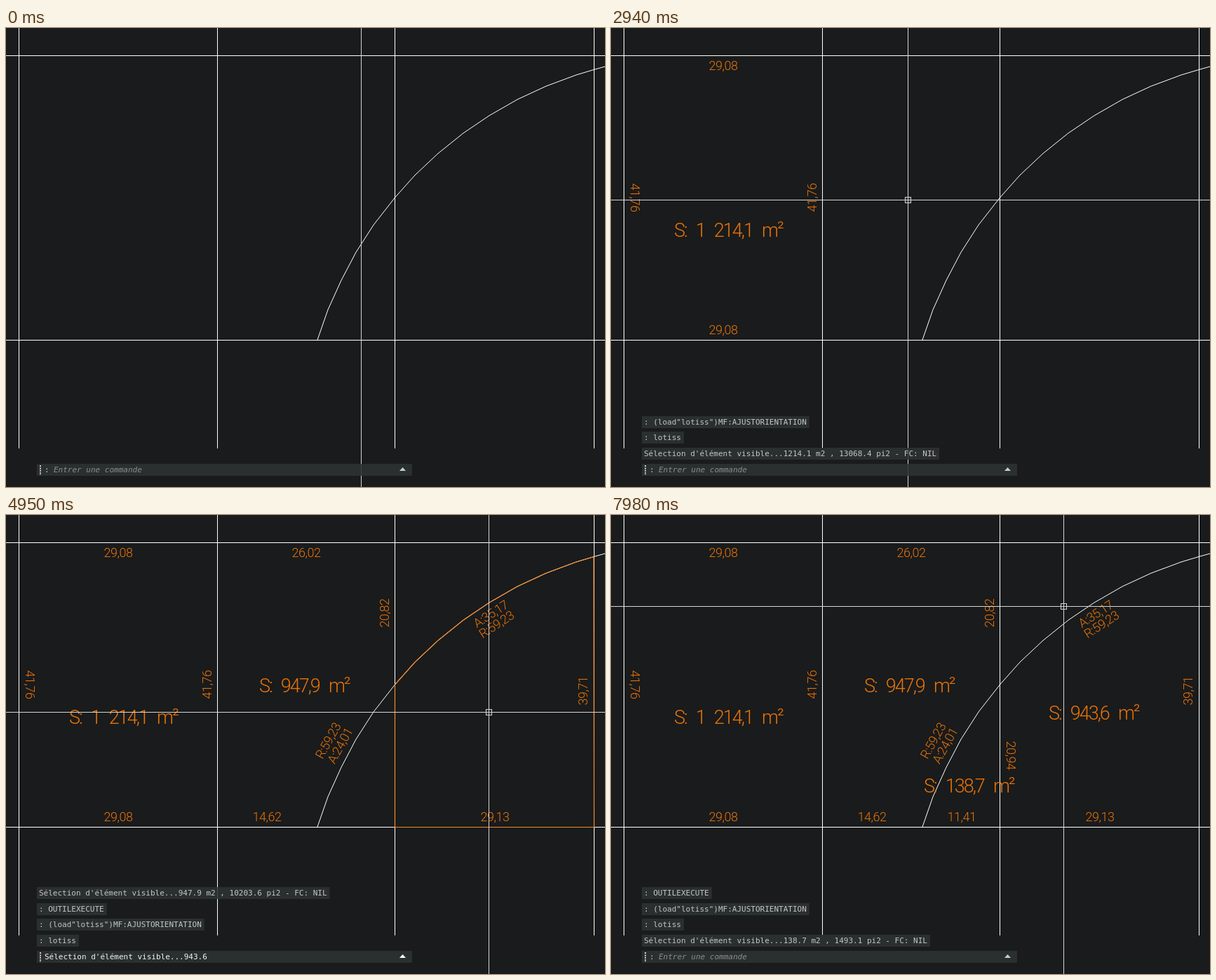
An HTML page for the animation above (8000 ms loop, 854 by 655 pixels).

```html
<!DOCTYPE html>
<html lang="fr">
<head>
<meta charset="utf-8">
<title>Lotissement</title>
<style>
  html, body { margin: 0; width: 100%; height: 100%; overflow: hidden; background: #1a1b1c; }
  svg { display: block; width: 100vw; height: 100vh; }
  text { white-space: pre; }
  .line { fill: none; stroke: #fff; stroke-width: 1; }
  .crisp { shape-rendering: crispEdges; }
  .outline { fill: none; stroke: #f28a30; stroke-width: 1.2; }
  .dim, .area { font-family: Roboto, sans-serif; font-weight: 300; fill: #e87408; }
  .dim { font-size: 18px; letter-spacing: -.5px; text-anchor: middle; }
  .area { font-size: 27px; letter-spacing: -2px; word-spacing: 8.5px; }
  .area.hot { fill: #0f9ad0; font-weight: 400; }
  .cross { fill: none; stroke: #d6d6d6; stroke-width: 1; }
  .mono { font: 11px "DejaVu Sans Mono", monospace; fill: #c4c6c6; }
  .hint { fill: #8b8f8f; font-style: italic; }
  .run { fill: #f4f4f4; }
  .panel { fill: #2d3334; fill-opacity: .88; }
  .tip text { font: 10.7px "Open Sans", "Noto Sans", sans-serif; letter-spacing: -.2px; fill: #fff; }
</style>
</head>
<body>
<svg id="stage" viewBox="0 0 854 655" xmlns="http://www.w3.org/2000/svg"></svg>
<script>
const LOOP = 8000;
const stage = document.getElementById('stage');

function add(parent, tag, attrs = {}, text) {
  const node = document.createElementNS('http://www.w3.org/2000/svg', tag);
  for (const key in attrs) node.setAttribute(key, attrs[key]);
  if (text !== undefined) node.textContent = text;
  parent.appendChild(node);
  return node;
}
const show = (node, on) => { node.style.display = on ? '' : 'none'; };

// Plan: boundary lines and the segmented road curve
const arc = [[444, 445], [459, 402], [478, 360], [499, 320], [524, 281], [554.5, 242], [583, 210],
  [616, 179], [652, 150], [689, 125], [729, 102], [770, 83], [813, 67], [838, 59.5], [854, 55]];
const path = points => 'M' + points.map(p => p.join(' ')).join('L');

add(stage, 'path', {
  class: 'line crisp',
  d: 'M0 39.5H854M0 445.5H854' + [18, 301, 554, 838].map(x => `M${x + .5} 0V600`).join('')
});
add(stage, 'path', { class: 'line', d: path(arc) });

// Each lot: run from start to end, then the pointer leaves at `leave`
const lots = [
  { start: 1910, end: 2030, leave: 2190, x: 167, y: 288, textX: 90, area: '1 214,1',
    result: '1214.1', feet: '13068.4', edge: 'M18.5 39.5H301.5V445.5H18.5Z' },
  { start: 3270, end: 3420, leave: 3590, x: 425, y: 243, textX: 361, area: '947,9',
    result: '947.9', feet: '10203.6',
    edge: path([...arc.slice(0, 6), [554.5, 39.5], [301.5, 39.5], [301.5, 445.5]]) + 'Z' },
  { start: 4950, end: 5050, leave: 5210, x: 688, y: 282, textX: 624, area: '943,6',
    result: '943.6', feet: '10156.9',
    edge: path([...arc.slice(5, 14), [838.5, 445.5], [554.5, 445.5]]) + 'Z' },
  { start: 6970, end: 7180, leave: 7330, x: 510, y: 386, textX: 446, area: '138,7',
    result: '138.7', feet: '1493.1', edge: path([...arc.slice(0, 6), [554.5, 445.5]]) + 'Z' }
];
for (const lot of lots) {
  lot.done = lot.end - 60;
  lot.message = `Sélection d'élément visible...${lot.result}`;
  lot.summary = `${lot.message} m2 , ${lot.feet} pi2 - FC: NIL`;
  lot.outline = add(stage, 'path', { class: 'outline', d: lot.edge });
  lot.label = add(stage, 'text', { class: 'area', x: lot.textX, y: lot.y + 10 }, `S: ${lot.area} m`);
  add(lot.label, 'tspan', { dy: -3 }, '²');
}

// label, centre x, centre y, angle, time of appearance
const dims = [
  ['29,08', 160, 53, 0, 1910], ['29,08', 160, 430, 0, 1910],
  ['41,76', 34, 242, 90, 1910], ['41,76', 286, 242, -90, 1910],
  ['26,02', 428, 53, 0, 3270], ['14,62', 372, 430, 0, 3270],
  ['20,82', 539, 140, -90, 3270],
  ['R:59,23', 459, 322, -61, 3270], ['A:24,01', 476, 329, -61, 3270],
  ['A:35,17', 691, 141, -33, 4950], ['R:59,23', 699, 156, -33, 4950],
  ['39,71', 822, 251, -90, 4950], ['29,13', 697, 430, 0, 4950],
  ['20,94', 570, 343, 90, 4980], ['11,41', 500, 430, 0, 6970]
].map(([label, x, y, angle, time]) => ({
  time,
  node: add(stage, 'text', {
    class: 'dim', y: 6.5, transform: `translate(${x} ${y}) rotate(${angle})`
  }, label)
}));

// Crosshair
const hair = add(stage, 'path', { class: 'cross crisp' });

// Hover tooltip
const tip = add(stage, 'g', { class: 'tip' });
add(tip, 'rect', { x: .5, y: .5, width: 163, height: 72, fill: '#2b2d33', stroke: '#6c6e72', class: 'crisp' });
add(tip, 'rect', { x: 1, y: 1, width: 162, height: 16, fill: '#191a1d' });
add(tip, 'path', { d: 'M1 34.5H163M1 51.5H163M1 67.5H163M47.5 17V68', stroke: '#232429', class: 'crisp' });
add(tip, 'path', { d: 'M153.5 5.5l4 4m0 -4l-4 4', stroke: '#ddd' });
add(tip, 'rect', { x: 53.5, y: 19.5, width: 11, height: 11, fill: '#ff8000', stroke: '#111' });
for (const [label, x, y] of [
  ['Texte', 2, 13], ['Couleur', 5, 29], ['ParCalque', 70, 28], ['Calque', 5, 46],
  ['E-TXT-LOT-SUPERFICIE', 50, 46], ['Hauteur', 5, 63], ['1.6875 m', 51, 63]
]) add(tip, 'text', { x, y }, label);

// Command history and command line
const history = [531, 554, 576, 599].map(y => ({
  box: add(stage, 'rect', { class: 'panel', x: 44, y, height: 17 }),
  text: add(stage, 'text', { class: 'mono', x: 47, y: y + 11.5 })
}));
add(stage, 'rect', { class: 'panel', x: 44, y: 622, width: 535, height: 17 });
add(stage, 'path', { d: 'M49 624V638', stroke: '#d0d0d0', 'stroke-width': 2, 'stroke-dasharray': '2 1.4' });
const arrow = add(stage, 'path', { d: 'M561 632L565.5 627L570 632Z' });
const colon = add(stage, 'text', { class: 'mono', x: 55, y: 634 }, ':');
const hint = add(stage, 'text', { class: 'mono hint', x: 68, y: 634 }, 'Entrer une commande');
const running = add(stage, 'text', { class: 'mono run', x: 55, y: 634 });
const caret = add(stage, 'path', { d: 'M69.5 623V637', class: 'line crisp' });

const prompts = [[500, 1910], [3000, 3270], [4410, 4950], [5760, 6970]];

function historyLines(t) {
  const index = lots.findLastIndex(lot => t >= lot.start);
  if (index < 0) return [];
  const command = [': (load"lotiss")MF:AJUSTORIENTATION', ': lotiss'];
  if (index > 0) command.unshift(': OUTILEXECUTE');
  if (t >= lots[index].end) return [...command, lots[index].summary];
  return index > 0 ? [lots[index - 1].summary, ...command] : command;
}

// Pointer path: time, x, y
const route = [
  [0, 506, 660], [1050, 506, 660], [1400, 350, 450], [1850, 167, 288],
  [2190, 167, 288], [2350, 314, 329], [2650, 385, 285], [3000, 425, 243],
  [3590, 425, 243], [3730, 464, 306], [4020, 600, 310], [4410, 688, 281],
  [5210, 688, 281], [5480, 640, 350], [5760, 600, 418],
  [6230, 600, 418], [6390, 540, 395], [6570, 540, 395], [6740, 510, 385],
  [7330, 510, 385], [7650, 590, 250], [7980, 645, 130], [8000, 645, 130]
];

function slope(i, axis) {
  const before = route[i - 1], here = route[i], after = route[i + 1];
  if (!before || !after) return 0;
  const rests = p => p[1] === here[1] && p[2] === here[2];
  if (rests(before) || rests(after)) return 0;
  return (after[axis] - before[axis]) / (after[0] - before[0]);
}

function pointer(t) {
  const i = Math.max(0, route.findIndex(p => p[0] > t) - 1);
  const a = route[i], b = route[i + 1], span = b[0] - a[0];
  const u = (t - a[0]) / span, v = 1 - u;
  return [1, 2].map(axis => Math.round(
    v * v * (1 + 2 * u) * a[axis] + u * u * (3 - 2 * u) * b[axis] +
    span * u * v * (v * slope(i, axis) - u * slope(i + 1, axis))
  ));
}

function draw(t) {
  show(tip, false);
  for (const lot of lots) {
    const hot = t >= lot.leave + 30 && t < lot.leave + 240;
    show(lot.outline, t >= lot.start && t < lot.done);
    show(lot.label, t >= lot.done);
    lot.label.classList.toggle('hot', hot);
    if (hot) {
      show(tip, true);
      tip.setAttribute('transform', `translate(${lot.x + 9} ${lot.y - 34})`);
    }
  }
  for (const dim of dims) show(dim.node, t >= dim.time);

  const [x, y] = pointer(t);
  hair.setAttribute('d', `M${x + .5} 0V655M0 ${y + .5}H854M${x - 3.5} ${y - 3.5}h8v8h-8Z`);

  const lines = historyLines(t);
  history.forEach(({ box, text }, row) => {
    const line = lines[row - history.length + lines.length] || '';
    show(box, line);
    box.setAttribute('width', 7 + line.length * 6.62);
    if (text.textContent !== line) text.textContent = line;
  });

  const active = lots.find(lot => t >= lot.start && t < lot.done);
  const typing = prompts.some(([from, to]) => t >= from && t < to);
  running.textContent = active ? active.message : '';
  show(colon, !active);
  show(hint, !active && !typing);
  show(caret, typing);
  arrow.setAttribute('fill', active || typing ? '#fff' : '#c8cccc');
}

const origin = performance.now();
function tick() {
  draw((performance.now() - origin) % LOOP);
  requestAnimationFrame(tick);
}
tick();
</script>
</body>
</html>
```
